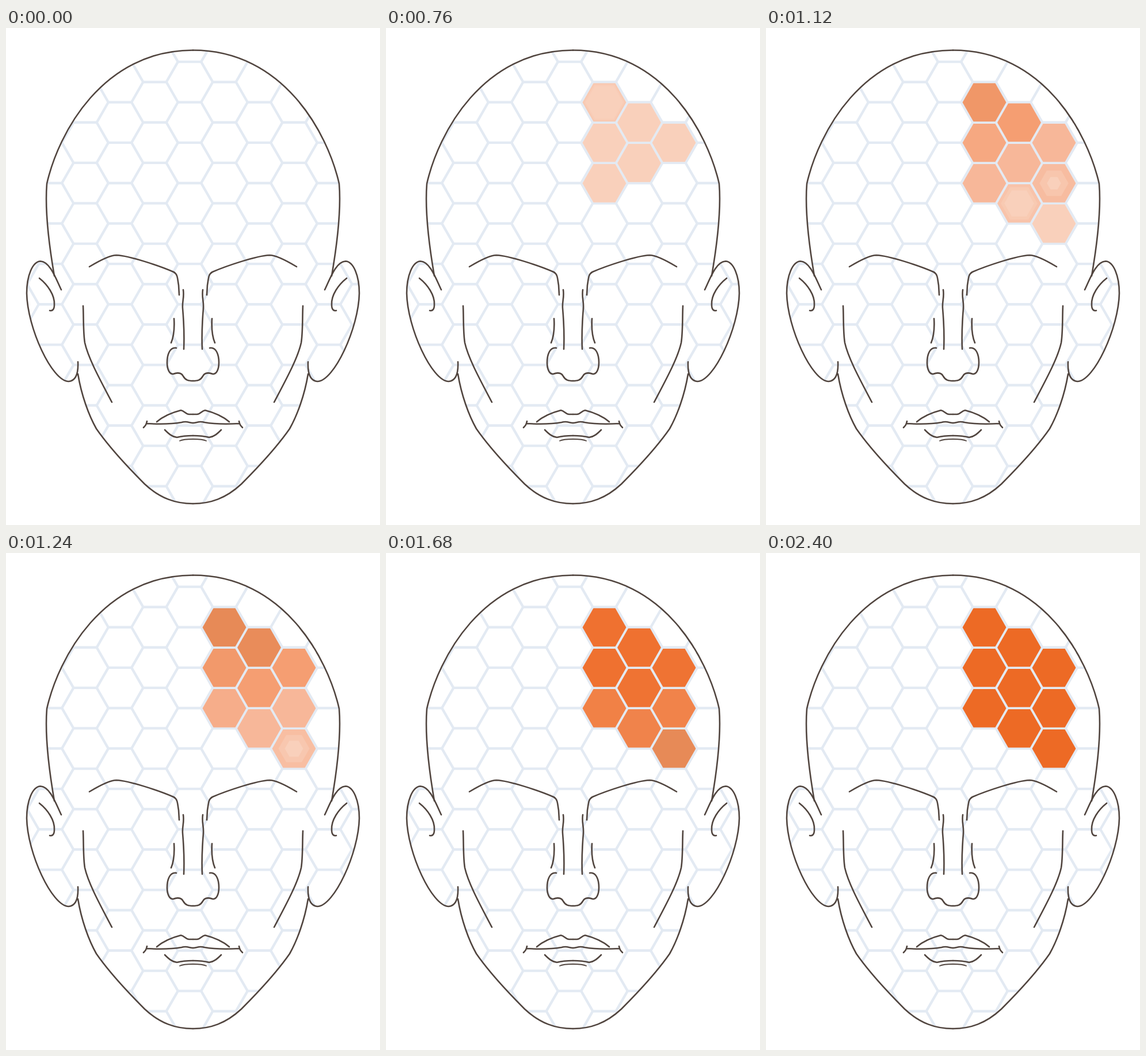
An HTML page for the animation above (2.44 s loop, 650 by 862 pixels).

```html
<!DOCTYPE html>
<html lang="en">
<head>
<meta charset="utf-8">
<title>Head with hexagons</title>
<style>
html, body { margin: 0; width: 100%; height: 100%; overflow: hidden; background: #fff; }
svg { display: block; width: 100vw; height: 100vh; }
</style>
</head>
<body>
<svg viewBox="0 0 650 862">
  <defs>
    <path id="skull" d="M325 38.5 C168 38.5 91 182 71 270 C67 320 75 378 84 430 L125 600 C131 637 144 672 157 695 C180 728 215 765 241 791 C268 816 295 825 325 825Z"/>
    <path id="ear" d="M96 454 C88 438 77 405 60 404.5 C46 405 36 430 36 460 C37 520 80 613 109 613 C121 612 126 600 125 579"/>
    <clipPath id="face">
      <use href="#skull"/><use href="#ear"/>
      <use href="#skull" transform="matrix(-1 0 0 1 650 0)"/>
      <use href="#ear" transform="matrix(-1 0 0 1 650 0)"/>
    </clipPath>
    <g id="half">
      <path d="M325 38.5 C168 38.5 91 182 71 270 C67 320 75 378 84 430"/>
      <use href="#ear"/>
      <path d="M125 600 C131 637 144 672 157 695 C180 728 215 765 241 791 C268 816 295 825 325 825"/>
      <path d="M58 434 C72 445 85 463 84 480 C84 489 80 491 76 490"/>
      <path d="M134 482 C135 502 134 528 137 546 C143 573 164 611 184 649"/>
      <path d="M145 414 C165 402 182 394 192 394 C215 395 268 413 291 423 C299 427 298 436 300 446 L301 463"/>
      <path d="M308 454 C310 468 306 474 307 486 C309 510 310 535 309 557"/>
      <path d="M292 504 C293 520 292 534 287 546"/>
      <path d="M296 555 C284 553 280 568 280 580 C280 592 284 601 291 600 C298 597 305 598 308 604 C312 611 317 612 325 612"/>
      <path d="M245 682 C244 688 242 690 239 693 M244 686 C262 687 288 687 305 684 C315 681 318 685 325 685"/>
      <path d="M262 683 C275 672 292 666 304 663 C310 664 312 670 318 670 L325 670"/>
      <path d="M276 697 C282 703 288 709 297 710 C305 708 315 707 325 707"/>
      <path d="M302 716 C308 713 316 713 325 713" stroke-width="1.8"/>
    </g>
  </defs>
  <rect width="650" height="862" fill="#fff"/>
  <path id="grid" clip-path="url(#face)" fill="none" stroke="#e3eaf3" stroke-width="4.4" stroke-linejoin="round"/>
  <g id="cells"></g>
  <g fill="none" stroke="#51453f" stroke-width="2.6" stroke-linecap="round" stroke-linejoin="round">
    <use href="#half"/>
    <use href="#half" transform="matrix(-1 0 0 1 650 0)"/>
  </g>
</svg>
<script>
const LOOP = 2440, STEP = 40, FADE = 80;
const DX = 60.5, DY = 70.1;

// Shades a cell passes through, from empty to full
const shades = ["#ffffff", "#f9d0bb", "#f7b799", "#f59e72", "#e78a57", "#f1834a", "#ef7130", "#ed6a25"]
  .map(s => [1, 3, 5].map(i => parseInt(s.slice(i, i + 2), 16)));

// Each shade spreads as a circular wave from one point
const focus = { x: 400.5, y: 101 };
const waves = [460, 665, 870, 1020, 1190, 1330, 1780];

function startTimes(x, y) {
  const dist = Math.hypot(x - focus.x, y - focus.y);
  return waves.map((start, i) => start + dist * (i ? 2 : 1.6));
}

function hex(x, y, w, h) {
  return `M${x - w} ${y}L${x - w / 2} ${y - h}H${x + w / 2}L${x + w} ${y}L${x + w / 2} ${y + h}H${x - w / 2}Z`;
}

function mix(a, b, p) {
  return `rgb(${a.map((v, i) => Math.round(v + (b[i] - v) * p))})`;
}

let mesh = "";
for (let c = -5; c <= 5; c++) {
  for (let r = -1; r < 12; r++) {
    mesh += hex(319 + c * DX, 93.7 + (r + (c & 1) / 2) * DY, DX * 2 / 3, DY / 2);
  }
}
document.getElementById("grid").setAttribute("d", mesh);

const layer = document.getElementById("cells");

function addHex() {
  const el = document.createElementNS("http://www.w3.org/2000/svg", "path");
  el.setAttribute("d", hex(0, 0, 38, 33.2));
  layer.append(el);
  return el;
}

const cells = [];
for (let c = 0; c < 3; c++) {
  for (let r = 0; r < 3; r++) {
    const x = 379.5 + c * DX, y = 129 + (r + c / 2) * DY;
    cells.push({ x, y, times: startTimes(x, y), parts: [addHex(), addHex(), addHex()] });
  }
}

function paint({ x, y, times, parts }, t) {
  const level = times.filter(s => t >= s).length;
  parts.forEach(el => el.setAttribute("visibility", "hidden"));
  if (!level) return;

  const p = level === 1 ? 1 : Math.min(1, (t - times[level - 1]) / FADE);
  const show = (i, amount, size) => {
    parts[i].setAttribute("visibility", "visible");
    parts[i].setAttribute("fill", mix(shades[level - 1], shades[level], amount));
    parts[i].setAttribute("transform", `translate(${x} ${y}) scale(${size})`);
  };
  show(0, p, 1);
  // The second shade closes in from the rim
  if (level === 2 && p < 1) {
    const hole = 1 - p ** 1.7;
    show(1, p * 0.5, (1 + hole) / 2);
    show(2, 0, hole);
  }
}

function draw(now) {
  const t = Math.floor(now % LOOP / STEP) * STEP;
  cells.forEach(cell => paint(cell, t));
}

let origin;
function tick(now) {
  origin ??= now;
  draw(now - origin);
  requestAnimationFrame(tick);
}
draw(0);
requestAnimationFrame(tick);
</script>
</body>
</html>
```
